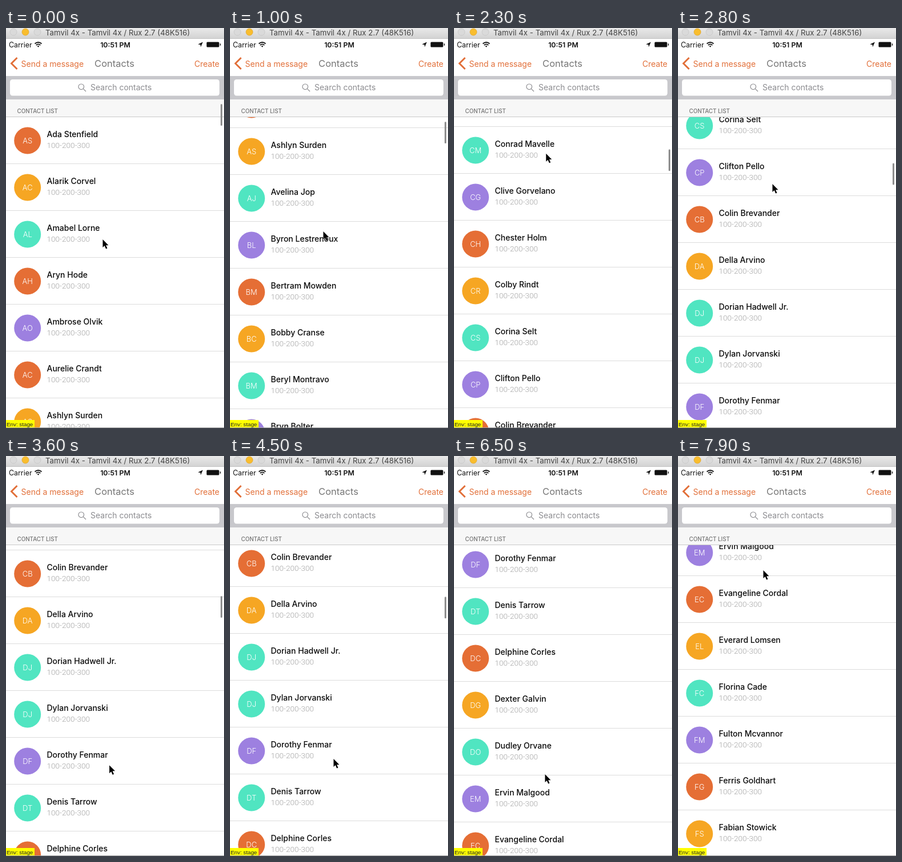
Recreate the animation shown at these times as an HTML page. Size 382x700 px, loop 8 s.

```html
<!DOCTYPE html>
<html lang="en">
<head>
<meta charset="utf-8">
<title>Contact list</title>
<style>
  html, body { margin: 0; width: 100%; height: 100%; overflow: hidden; background: #fff; }
  svg { display: block; width: 382px; height: 700px; font-family: Inter, Roboto, sans-serif; }
  .initials { font-size: 13px; font-weight: 300; fill: #fff; text-anchor: middle; }
  .name { font-size: 14px; font-weight: 500; fill: #0a0a0a; }
  .phone { font: 300 13.6px Roboto, sans-serif; fill: #a4a4a4; }
  .nav { font-size: 14px; fill: #e2703a; }
  .status { font-size: 12.4px; fill: #111; }
</style>
</head>
<body>
<svg viewBox="0 0 382 700" xmlns="http://www.w3.org/2000/svg">
  <defs>
    <linearGradient id="chrome" x2="0" y2="1">
      <stop stop-color="#e9e9e9"/><stop offset="1" stop-color="#d3d3d3"/>
    </linearGradient>
  </defs>
  <rect width="382" height="700" fill="#fff"/>
  <g id="list"></g>

  <!-- Window title -->
  <rect width="382" height="18" fill="url(#chrome)"/>
  <path d="M0 18.5H382" stroke="#c4c4c4"/>
  <g fill="#dadada" stroke="#c6c6c6" stroke-width=".8">
    <circle cx="13" cy="7" r="6"/>
    <circle cx="34" cy="7" r="6" fill="#f9bd2e" stroke="#e0a52a"/>
    <circle cx="55" cy="7" r="6"/>
  </g>
  <text x="69" y="12.5" font-size="13.3" fill="#454545">Tamvil 4x - Tamvil 4x / Rux 2.7 (48K516)</text>

  <!-- Status and navigation -->
  <rect y="19" width="382" height="65" fill="#fff"/>
  <text class="status" x="5" y="33.5">Carrier</text>
  <g fill="none" stroke="#111" stroke-width="1.7">
    <path d="M50.5 27.5Q56.5 22.5 62.5 27.5M52.7 30Q56.5 26.8 60.3 30"/>
    <path d="M56.5 33.8L54.6 31.6Q56.5 30.2 58.4 31.6Z" fill="#111" stroke="none"/>
  </g>
  <text class="status" x="191.5" y="33.5" font-weight="600" text-anchor="middle">10:51 PM</text>
  <path d="M345 24.5L341.2 33.3L340.6 29.2L336.4 28.6Z" fill="#111"/>
  <rect x="351.5" y="24.5" width="22" height="9" rx="1.5" fill="#111"/>
  <path d="M375.6 27.3V30.7" stroke="#111" stroke-width="1.4"/>
  <path d="M19.5 52L9.5 62L19.5 72" fill="none" stroke="#e2703a" stroke-width="3"/>
  <text class="nav" x="26.5" y="67.5">Send a message</text>
  <text x="190" y="68" font-size="16.5" fill="#777" text-anchor="middle">Contacts</text>
  <text class="nav" x="374" y="67.5" text-anchor="end">Create</text>

  <!-- Search -->
  <rect y="84" width="382" height="41" fill="#c8c8cc"/>
  <rect x="7" y="90" width="367" height="28.5" rx="4.5" fill="#fff"/>
  <g fill="none" stroke="#8c8c90" stroke-width="1.2">
    <circle cx="131.8" cy="102.8" r="4.8"/><path d="M135.3 106.3L140 111"/>
  </g>
  <text x="148" y="109" font-size="14" fill="#8c8c90">Search contacts</text>

  <!-- Section header -->
  <rect y="125" width="382" height="30" fill="#f7f7f7"/>
  <path d="M0 155.5H382" stroke="#c9c9c9"/>
  <text x="19.5" y="148.5" font-size="9.8" font-weight="500" fill="#747474">CONTACT LIST</text>

  <rect id="bar" x="376" width="3" height="38" rx="1.5" fill="#8e8e8e"/>
  <path d="M0 699.5H382" stroke="#a0a0a0"/>
  <rect y="686" width="50" height="13" fill="#ff0"/>
  <text x="1" y="696.5" font-size="9.8" fill="#222" style="font-family: 'Liberation Sans', sans-serif">Env: stage</text>
  <path id="cursor" d="M0 0V14L3.2 11L5.6 16.6L8 15.6L5.6 10.2H10Z" fill="#000" stroke="#fff" stroke-width="1" paint-order="stroke"/>
</svg>
<script>
const LOOP = 8000, STEP = 100, ROW = 82, TOP = 155.5;
const PHONE = '100-200-300';
const palette = { o: '#e56e35', y: '#f6a623', t: '#50e5c1', p: '#9d80e0' };
const tints = 'oyto' + 'poyt'.repeat(5) + 'tptoytpoytpoyt';
const people = [
  'Ada Stenfield', 'Alarik Corvel', 'Amabel Lorne', 'Aryn Hode', 'Ambrose Olvik',
  'Aurelie Crandt', 'Ashlyn Surden', 'Avelina Jop', 'Byron Lestrenoux', 'Bertram Mowden',
  'Bobby Cranse', 'Beryl Montravo', 'Bryn Bolter', 'Belinda Gorsa', 'Cyril Cambet',
  'Conrad Mavelle', 'Clive Gorvelano', 'Chester Holm', 'Colby Rindt', 'Corina Selt',
  'Clifton Pello', 'Colin Brevander', 'Della Arvino', 'Dorian Hadwell Jr.', 'Dylan Jorvanski',
  'Dorothy Fenmar', 'Denis Tarrow', 'Delphine Corles', 'Dexter Galvin', 'Dudley Orvane',
  'Ervin Malgood', 'Evangeline Cordal', 'Everard Lomsen', 'Florina Cade', 'Fulton Mcvannor',
  'Ferris Goldhart', 'Fabian Stowick'
];

// Key poses: [time, value]
const scrollAt = curve([
  [0, 0], [200, 90], [400, 260], [600, 385], [800, 448], [1000, 473],
  [1200, 560], [1400, 710], [1600, 810], [1800, 857], [2000, 895],
  [2200, 1090], [2400, 1330], [2600, 1490], [2800, 1584], [3100, 1665],
  [3400, 1702], [3700, 1715], [4300, 1716], [4500, 1731], [4700, 1820],
  [4900, 1930], [5200, 2040], [5400, 2057], [6600, 2057], [6800, 2150],
  [7000, 2300], [7200, 2430], [7500, 2488], [8000, 2488]
]);
const barAt = curve([
  [0, 1], [3900, 1], [4150, 0], [4300, 0], [4400, 1], [5600, 1], [5900, 0],
  [6600, 0], [6700, 1], [7600, 1], [7850, 0], [8000, 0]
]);
const path = [
  [0, 169, 370], [400, 160, 200], [500, 160, 195], [1000, 163, 356], [1400, 152, 200],
  [1800, 147, 278], [2000, 165, 380], [2400, 160, 190], [2800, 165, 273], [3500, 180, 540],
  [4300, 183, 545], [4500, 181, 530], [5100, 150, 212], [5500, 150, 210], [6200, 160, 560],
  [6500, 159, 557], [7100, 148, 205], [7900, 149, 200], [8000, 149, 200]
];
const cursorX = curve(path.map(([t, x]) => [t, x]));
const cursorY = curve(path.map(([t, , y]) => [t, y]));

// Monotone cubic through the given points
function curve(points) {
  const last = points.length - 1;
  const slope = i => (points[i + 1][1] - points[i][1]) / (points[i + 1][0] - points[i][0]);
  const tangent = points.map((_, i) => {
    if (i === 0) return slope(0);
    if (i === last) return 0;
    const a = slope(i - 1), b = slope(i);
    return a * b > 0 ? 2 * a * b / (a + b) : 0;
  });
  return t => {
    let i = 0;
    while (i < last - 1 && t >= points[i + 1][0]) i++;
    const [t0, v0] = points[i], [t1, v1] = points[i + 1];
    const span = t1 - t0, u = (t - t0) / span, w = 1 - u;
    return v0 * (1 + 2 * u) * w * w + v1 * u * u * (3 - 2 * u)
      + span * u * w * (tangent[i] * w - tangent[i + 1] * u);
  };
}

const byId = id => document.getElementById(id);
const list = byId('list'), bar = byId('bar'), cursor = byId('cursor');

list.innerHTML = people.map((name, i) => {
  const words = name.split(' ');
  const initials = words[0][0] + words[words.length - 1][0];
  return `<g transform="translate(0 ${TOP + i * ROW})">
    <circle cx="37.7" cy="41.5" r="23.5" fill="${palette[tints[i]]}"/>
    <text class="initials" x="37.7" y="46.2">${initials}</text>
    <text class="name" x="71.5" y="35">${name}</text>
    <text class="phone" x="71.5" y="54.5">${PHONE}</text>
    <path d="M0 ${ROW}H382" stroke="#dcdcdc"/>
  </g>`;
}).join('');

function draw(time) {
  const t = Math.floor(time % LOOP / STEP) * STEP;
  const scroll = Math.round(scrollAt(t));
  list.setAttribute('transform', `translate(0 ${-scroll})`);
  bar.setAttribute('y', 133 + scroll / 15.3);
  bar.setAttribute('opacity', barAt(t));
  cursor.setAttribute('transform', `translate(${cursorX(t) + 0.5} ${cursorY(t)})`);
}

const start = performance.now();
function tick() {
  draw(performance.now() - start);
  requestAnimationFrame(tick);
}
tick();
</script>
</body>
</html>
```
